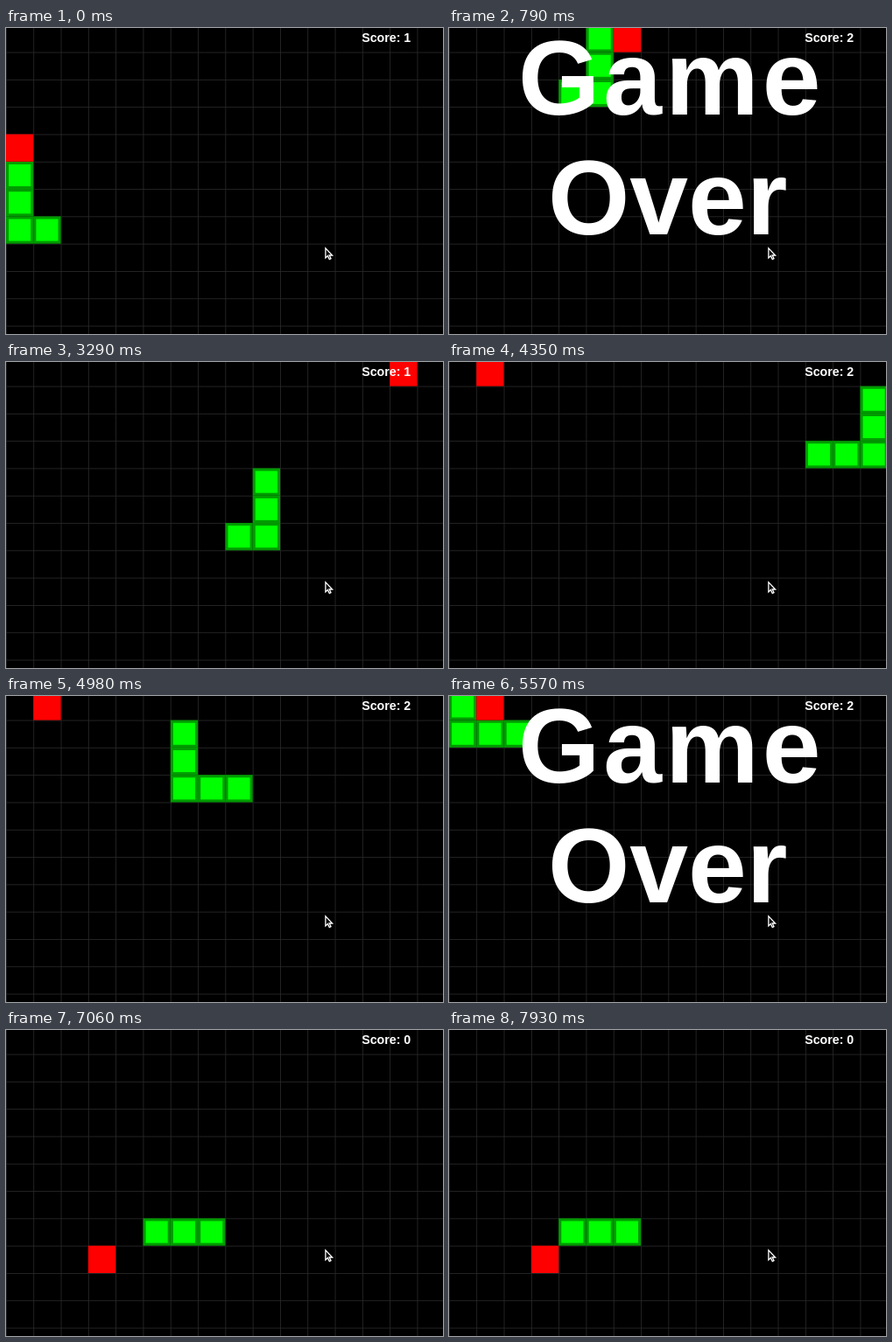
These frames come from a looping animation (499 px wide and 350 px high, 7.99 s). An HTML page with a canvas:

```html
<!DOCTYPE html>
<html lang="en">
<head>
<meta charset="utf-8">
<title>Snake</title>
<style>
  html, body { margin: 0; width: 100%; height: 100%; overflow: hidden; background: #000; }
  canvas { display: block; }
</style>
</head>
<body>
<canvas id="stage" width="499" height="350"></canvas>
<script>
const ctx = document.getElementById('stage').getContext('2d');
const WIDTH = 499, HEIGHT = 350, LOOP = 7990;
const CELL = 31.3, TOP = -3.7, INSET = 3.1, LINE = 0.85, LONG_TICK = 110;
const FONT = '"Liberation Sans", Arial, sans-serif';
const DIRS = { U: [0, -1], D: [0, 1], L: [-1, 0], R: [1, 0] };

// Twelve ticks from start to end; the listed ticks last longer than the rest.
function ticks(start, end, slow = [3, 9]) {
  const short = (end - start - LONG_TICK * slow.length) / (11 - slow.length);
  const times = [start];
  for (let i = 0; i < 11; i++) times.push(times[i] + (slow.includes(i) ? LONG_TICK : short));
  return times;
}

// Bodies run from tail to head.
const START = [[5, 5], [6, 5], [7, 5]];
const rounds = [
  {
    body: [[1, 7], [0, 7], [0, 6], [0, 5]],
    route: 'U3 R5 U3',
    foods: [[0, 4], [6, 0]],
    times: [0, ...ticks(60, 790, [5])]
  },
  {
    body: START,
    route: 'R3 D2 L7 U4 R4 D3 R2 U6 R6 D3 L9 U2 L6 U2',
    foods: [[3, 3], [14, 0], [1, 0]],
    times: [
      ...ticks(1450, 2230, [2, 7]), ...ticks(2290, 3060), ...ticks(3110, 3870),
      ...ticks(3930, 4690), ...ticks(4750, 5510), 5570
    ]
  },
  {
    body: START,
    route: 'R3 D2 L6 D2 R4 U2 L4',
    foods: [[3, 8]],
    times: [...ticks(6350, 7110, [3, 8]), ...ticks(7170, 7930)]
  }
];

// Plays a round into a list of timed states; running out of moves ends the game.
function play({ body, route, foods, times }) {
  const moves = route.split(' ').flatMap(leg => Array(+leg.slice(1)).fill(DIRS[leg[0]]));
  let snake = body, eaten = 0;
  return times.map((time, i) => {
    const move = moves[i - 1];
    if (move) {
      const [x, y] = snake[snake.length - 1];
      const head = [x + move[0], y + move[1]];
      const food = foods[eaten];
      const ate = head[0] === food[0] && head[1] === food[1];
      if (ate) eaten++;
      snake = [...snake.slice(ate ? 0 : 1), head];
    }
    return { time, snake, food: foods[eaten], score: snake.length - 3, over: i > moves.length };
  });
}

const states = rounds.flatMap(play);

function box([col, row], color, inset = 0) {
  ctx.fillStyle = color;
  ctx.fillRect(col * CELL + inset, row * CELL + TOP + inset, CELL - 2 * inset, CELL - 2 * inset);
}

function text(string, x, y, size, spacing = 0) {
  ctx.font = `bold ${size}px ${FONT}`;
  ctx.letterSpacing = spacing + 'px';
  ctx.fillStyle = '#fff';
  ctx.fillText(string, x, y);
}

function drawGrid() {
  ctx.fillStyle = '#000';
  ctx.fillRect(0, 0, WIDTH, HEIGHT);
  ctx.fillStyle = '#282828';
  for (let i = 0; i < 16; i++) {
    ctx.fillRect(i * CELL, 0, LINE, HEIGHT);
    ctx.fillRect(0, i * CELL + TOP, WIDTH, LINE);
  }
}

const pointer = new Path2D('M364.9 251.8 V263 L367.4 260.6 L369.3 264.6 L371 263.8 L369.2 260 H372.6 Z');

function drawPointer() {
  ctx.fillStyle = '#000';
  ctx.fill(pointer);
  ctx.strokeStyle = '#fff';
  ctx.lineWidth = 1.3;
  ctx.stroke(pointer);
}

function draw({ snake, food, score, over }) {
  drawGrid();
  for (const cell of snake) {
    box(cell, '#009b00');
    box(cell, '#0f0', INSET);
  }
  box(food, '#f00');
  text('Score: ' + score, 406.2, 16, 14.2);
  if (over) {
    text('Game', 79, 99, 120, 4);
    text('Over', 113, 236, 120);
  }
  drawPointer();
}

const origin = performance.now();

function frame() {
  const t = (performance.now() - origin) % LOOP;
  draw(states.findLast(state => state.time <= t + 0.5));
  requestAnimationFrame(frame);
}
frame();
</script>
</body>
</html>
```
